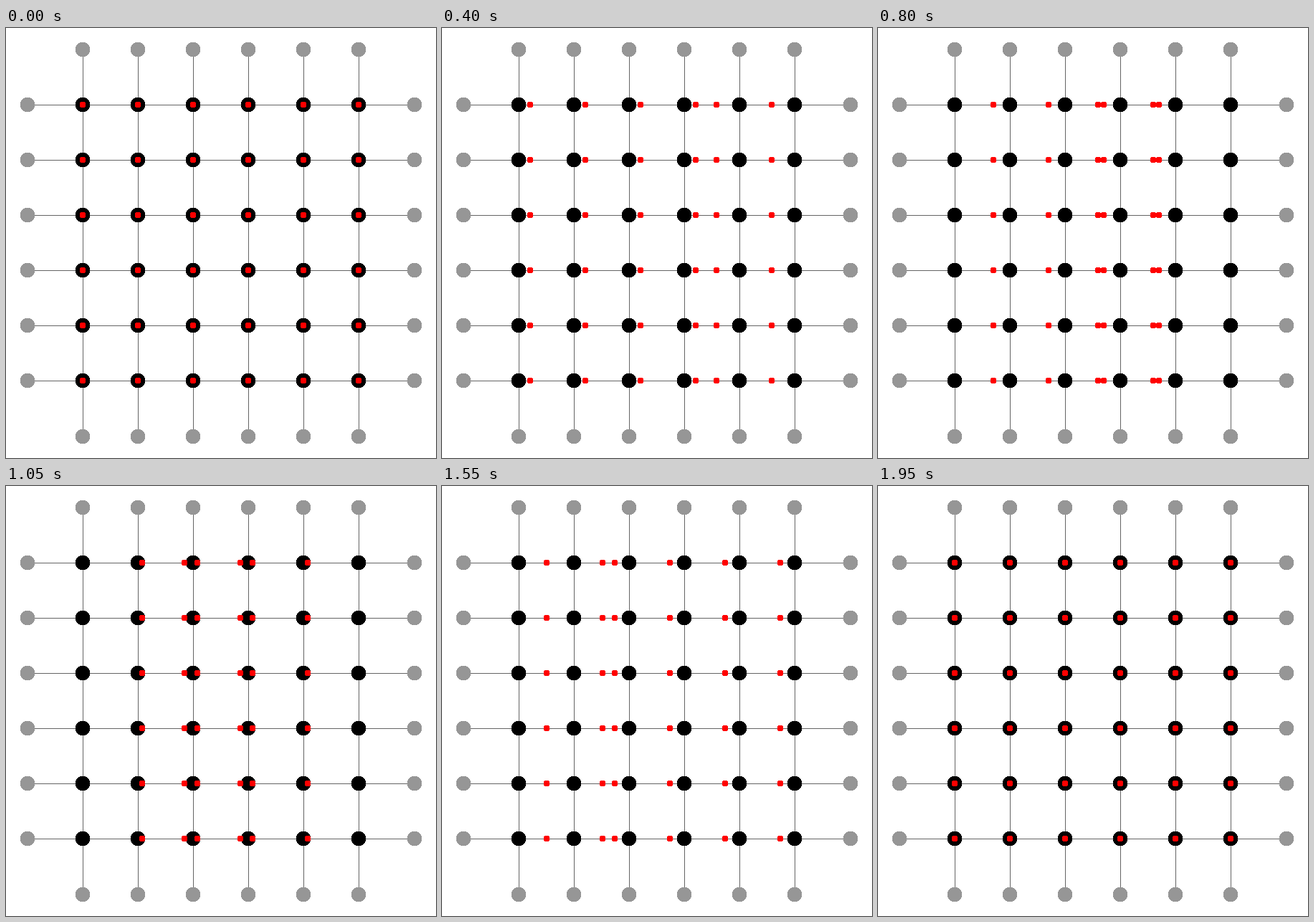
Write a matplotlib script that moves like this. It is 600 px wide and 600 px high and loops after 2 s.

```python
import matplotlib.pyplot as plt
from matplotlib.animation import FuncAnimation
from matplotlib.patches import Circle

SIZE, DPI = 600, 100
FRAMES, INTERVAL = 40, 50
N, SHIFT = 6, 2            # grid nodes per side, cyclic shift to the right
LOW, HIGH = 30, 570
STEP = (HIGH - LOW) / (N + 1)
NODE_R, DOT_R = 9.8, 3.65

fig = plt.figure(figsize=(SIZE / DPI, SIZE / DPI), dpi=DPI, facecolor="white")
ax = fig.add_axes([0, 0, 1, 1])
ax.set_xlim(0, SIZE)
ax.set_ylim(SIZE, 0)
ax.axis("off")


def node(i):
    return LOW + (i + 1) * STEP


def disc(x, y, radius, color, z):
    patch = Circle((int(x), int(y)), radius, facecolor=color,
                   edgecolor="none", linewidth=0, antialiased=False, zorder=z)
    return ax.add_patch(patch)


def line(xs, ys):
    # Half-pixel offset without snapping fills exactly one pixel row or column.
    ax.plot([int(x) + 0.5 for x in xs], [int(y) + 0.5 for y in ys],
            color="#646464", lw=72 / DPI, antialiased=False, snap=False,
            solid_capstyle="butt", zorder=1)


def smoothstep(u):
    return u * u * (3 - 2 * u)


for i in range(N):
    c = node(i)
    line((LOW, HIGH), (c, c))
    line((c, c), (LOW, HIGH))
    for end in (LOW, HIGH):
        disc(end, c, NODE_R, "#969696", 2)
        disc(c, end, NODE_R, "#969696", 2)
    for j in range(N):
        disc(c, node(j), NODE_R, "black", 3)

dots = [(col, row, disc(node(col), node(row), DOT_R, "red", 4))
        for row in range(N) for col in range(N)]


def update(frame):
    p = smoothstep(frame / FRAMES)
    for col, row, dot in dots:
        start, stop = node(col), node((col + SHIFT) % N)
        dot.center = int(start + (stop - start) * p), int(node(row))
    return [dot for _, _, dot in dots]


anim = FuncAnimation(fig, update, frames=FRAMES, interval=INTERVAL,
                     init_func=lambda: update(0), repeat=True, repeat_delay=0)
plt.show()
```
